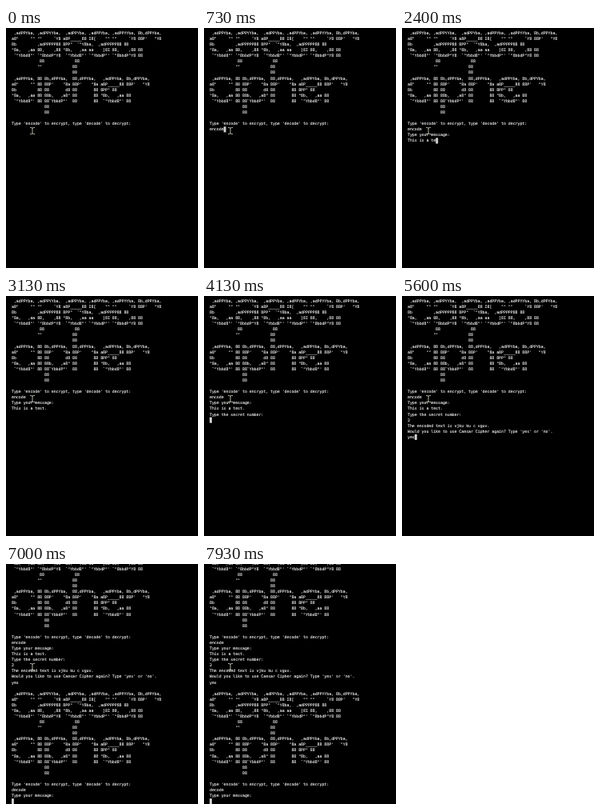
Animation, 240 px wide and 300 px high, one loop 8000 ms. Source, as an HTML page:

```html
<!DOCTYPE html>
<html lang="en">
<head>
<meta charset="utf-8">
<title>Cipher terminal</title>
<style>
  html, body { margin: 0; width: 100%; height: 100%; overflow: hidden; background: #000; }
  svg { display: block; width: 100vw; height: 100vh; }
  text {
    font: 4.87px "DejaVu Sans Mono", monospace;
    fill: #fafafa;
    stroke: #fafafa;
    stroke-width: .1;
    white-space: pre;
    text-rendering: geometricPrecision;
  }
</style>
</head>
<body>
<svg viewBox="0 0 240 300">
  <rect width="240" height="300" fill="#000"/>
  <g id="rows"></g>
  <rect id="caret" width="2.93" height="7.08" fill="#d0d0d0"/>
  <path d="M30 124.5h1.6q1.4 0 1.4 1.2q0-1.2 1.4-1.2H36M33 125.5v6M30 132.5h1.6q1.4 0 1.4-1.2q0 1.2 1.4 1.2H36"
        fill="none" stroke="#c8c6b8" stroke-width=".9"/>
</svg>
<script type="text/plain" id="banner">
 ,adPPYba, ,adPPYYba,  ,adPPYba, ,adPPYba, ,adPPYYba, 8b,dPPYba,
a8"     "" ""     `Y8 a8P_____88 I8[    "" ""     `Y8 88P'   "Y8
8b         ,adPPPPP88 8PP"  `"Y8ba,  ,adPPPPP88 88
"8a,   ,aa 88,    ,88 "8b,   ,aa aa    ]8I 88,    ,88 88
 `"Ybbd8"' `"8bbdP"Y8  `"Ybbd8"' `"YbbdP"' `"8bbdP"Y8 88
            88             88
           ""             88
                          88
 ,adPPYba, 88 8b,dPPYba,  88,dPPYba,   ,adPPYba, 8b,dPPYba,
a8"     "" 88 88P'    "8a 88P'    "8a a8P_____88 88P'   "Y8
8b         88 88       d8 88       88 8PP" 88
"8a,   ,aa 88 88b,   ,a8" 88       88 "8b,   ,aa 88
 `"Ybbd8"' 88 88`YbbdP"'  88       88  `"Ybbd8"' 88
              88
              88
</script>
<script>
const LOOP = 8000, BLINK = 530;
const LEFT = 7, TOP = 2.9, CHAR = 2.93, ROW = 7.08, ROWS = 42, BASELINE = 5;

const byId = id => document.getElementById(id);
const banner = byId('banner').textContent.slice(1, -1).split('\n');
const start = [...banner, '', "Type 'encode' to encrypt, type 'decode' to decrypt:"];

// Each step prints its output, then the answer is typed from `at` and sent at `enter`.
const steps = [
  { output: start, answer: 'encode', at: 120, pace: 95, enter: 780 },
  { output: ['Type your message:'], answer: 'This is a test.', at: 1590, pace: 70, enter: 3650 },
  { output: ['Type the secret number:'], answer: '2', at: 4250, pace: 100, enter: 4600 },
  {
    output: [
      'The encoded text is vjku ku c vguv.',
      "Would you like to use Caesar Cipher again? Type 'yes' or 'no'."
    ],
    answer: 'yes', at: 5250, pace: 150, enter: 5850
  },
  { output: ['', ...start], answer: 'decode', at: 6050, pace: 95, enter: 6750 },
  { output: ['Type your message:'], answer: '', at: Infinity, pace: 100, enter: Infinity }
];

// One extra row keeps the cut-off line above the top edge.
const rows = Array.from({ length: ROWS + 1 }, (_, i) => {
  const row = document.createElementNS('http://www.w3.org/2000/svg', 'text');
  row.setAttribute('x', LEFT);
  row.setAttribute('y', TOP + (i - 1) * ROW + BASELINE);
  return byId('rows').appendChild(row);
});

function terminalAt(t) {
  const lines = [];
  let lastInput = -BLINK;
  for (const { output, answer, at, pace, enter } of steps) {
    const typed = Math.max(0, Math.min(answer.length, Math.floor((t - at) / pace) + 1));
    lines.push(...output, answer.slice(0, typed));
    if (typed) lastInput = at + (typed - 1) * pace;
    if (t < enter) break;
    lastInput = enter;
  }
  return { lines, caretOn: Math.floor((t - lastInput) / BLINK) % 2 === 0 };
}

function draw(t) {
  const { lines, caretOn } = terminalAt(t);
  const scroll = Math.max(0, lines.length - ROWS);
  rows.forEach((row, i) => {
    const line = lines[scroll + i - 1] || '';
    if (row.textContent !== line) row.textContent = line;
  });
  const caret = byId('caret');
  caret.setAttribute('x', LEFT + lines.at(-1).length * CHAR);
  caret.setAttribute('y', TOP + (lines.length - 1 - scroll) * ROW);
  caret.setAttribute('visibility', caretOn ? 'visible' : 'hidden');
}

const began = performance.now();
function tick() {
  draw((performance.now() - began) % LOOP);
  requestAnimationFrame(tick);
}
tick();
</script>
</body>
</html>
```
